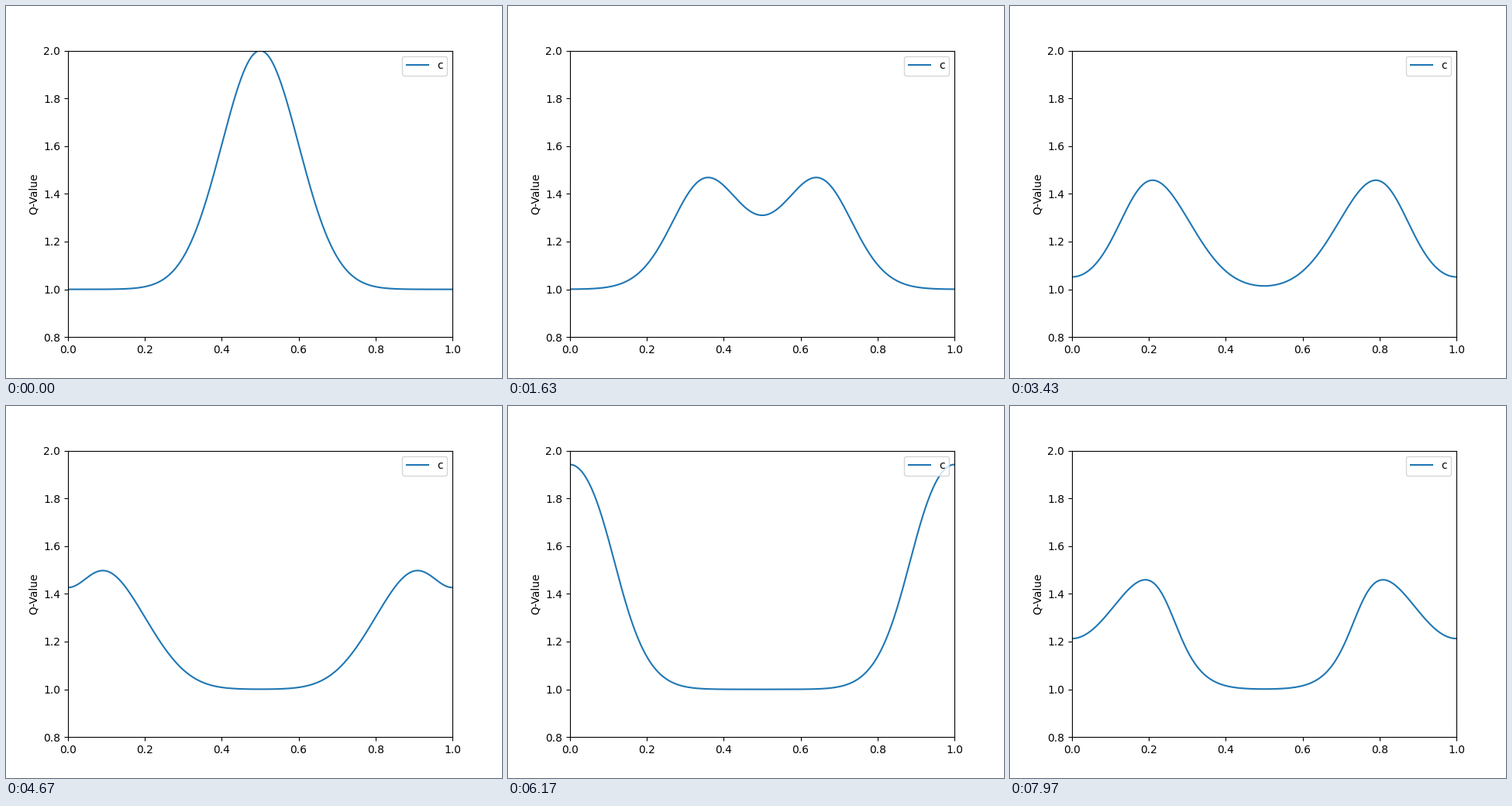
Recreate the animation shown at these times as a matplotlib script. Size 640 px wide and 480 px high, loop 8 s.

```python
import numpy as np
import matplotlib.pyplot as plt
from matplotlib.animation import FuncAnimation

FRAMES = 240
LOOP_MS = 8000
CELLS = 800
SUBSTEPS = 6
STEP = 0.0025  # model time per frame
POWER = 3      # Q = stretch ** POWER

dt = STEP / SUBSTEPS


def hump(x):
    return 1 + np.exp(-((x - 0.5) / 0.1) ** 2 / 2)


def simulate():
    """Elastic line between two fixed walls, released from rest."""
    nodes = np.linspace(0, 1, CELLS + 1)
    mass = np.diff(nodes) / hump((nodes[1:] + nodes[:-1]) / 2) ** (1 / POWER)
    node_mass = (mass[1:] + mass[:-1]) / 2
    vel = np.zeros(CELLS + 1)
    rows = []
    for i in range(FRAMES * SUBSTEPS):
        stretch = np.diff(nodes) / mass
        if i % SUBSTEPS == 0:
            mid = (nodes[1:] + nodes[:-1]) / 2
            rows.append((np.r_[0, mid, 1], np.pad(stretch ** POWER, 1, "edge")))
        tension = stretch ** (POWER - 1) / (POWER - 1)
        kick = dt if i else dt / 2
        vel[1:-1] += kick * np.diff(tension) / node_mass
        nodes = nodes + dt * vel
    return rows


waves = simulate()

fig, ax = plt.subplots(figsize=(6.4, 4.8), dpi=100)
line, = ax.plot(*waves[0], label="c")
ax.set_xlim(0, 1)
ax.set_ylim(0.8, 2)
ax.set_ylabel("Q-Value")
ax.legend(loc="upper right")


def update(i):
    line.set_data(*waves[i])
    return line,


anim = FuncAnimation(fig, update, frames=FRAMES, interval=LOOP_MS / FRAMES,
                     repeat=True, repeat_delay=0)
plt.show()
```
